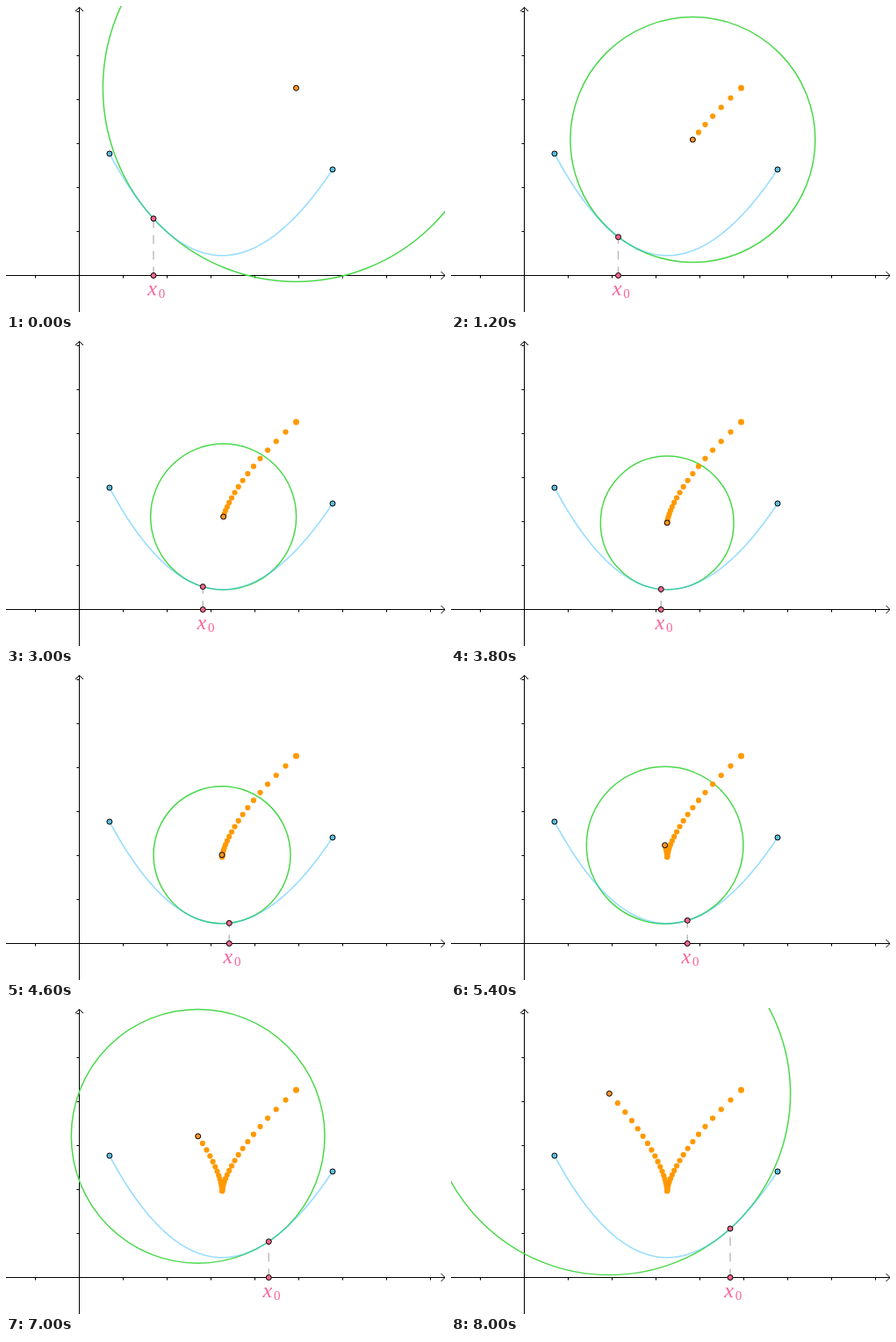
Write an HTML page that moves like this. It is 500 px wide and 348 px high and loops after 8.2 s.

```html
<!DOCTYPE html>
<html lang="en">
<head>
<meta charset="utf-8">
<title>Osculating circle</title>
<style>
  html, body { margin: 0; width: 100%; height: 100%; overflow: hidden; background: #fff; }
  svg { display: block; width: 500px; height: 348px; }
  .axis { fill: none; stroke: #000; stroke-width: 1; }
  .point { stroke: #000; stroke-width: 1; }
  .label { fill: #f9649b; font: italic 24px "Liberation Serif", serif; }
  .label .sub { font: 15px "Liberation Serif", serif; }
</style>
</head>
<body>
<svg id="stage" viewBox="0 0 500 348"></svg>
<script>
const STEP = 200, STEPS = 41;
const AXIS_X = 83.5, AXIS_Y = 306.5, UNIT = 50;
const START_X = 168, STEP_X = 3.75;
const CURVE = { from: 117.9, to: 372, minX: 246.15, minY: 283.75, bend: 0.013206, twist: 2.04e-5 };

const stage = document.getElementById('stage');

function add(tag, attrs, parent = stage) {
  const el = document.createElementNS('http://www.w3.org/2000/svg', tag);
  set(el, attrs);
  return parent.appendChild(el);
}

function set(el, attrs) {
  for (const key in attrs) el.setAttribute(key, attrs[key]);
}

// Cubic curve: height, slope and second derivative measured upwards.
function curveY(x) {
  const d = x - CURVE.minX;
  return CURVE.minY - CURVE.bend * d * d / 2 + CURVE.twist * d ** 3 / 6;
}

function osculating(x) {
  const d = x - CURVE.minX;
  const slope = CURVE.bend * d - CURVE.twist * d * d / 2;
  const second = CURVE.bend - CURVE.twist * d;
  const q = 1 + slope * slope;
  return { cx: x - slope * q / second, cy: curveY(x) - q / second, r: q ** 1.5 / second };
}

const xAt = step => START_X + STEP_X * step;
const point = (fill, cx = 0, cy = 0) => add('circle', { class: 'point', r: 3, fill, cx, cy });

function drawAxes() {
  let d = `M0 ${AXIS_Y}H500M495.5 302L500 ${AXIS_Y}L495.5 311` +
          `M${AXIS_X} 348V1.5M79 6L${AXIS_X} 1.5L88 6`;
  for (let x = AXIS_X - UNIT; x < 500; x += UNIT) if (x !== AXIS_X) d += `M${x} ${AXIS_Y}v3`;
  for (let y = AXIS_Y - UNIT; y > 0; y -= UNIT) d += `M${AXIS_X} ${y}h-3`;
  add('path', { class: 'axis', d });
}

function curvePath() {
  const n = 80, pts = [];
  for (let i = 0; i <= n; i++) {
    const x = CURVE.from + (CURVE.to - CURVE.from) * i / n;
    pts.push(`${x.toFixed(2)} ${curveY(x).toFixed(2)}`);
  }
  return 'M' + pts.join('L');
}

drawAxes();
const circle = add('circle', { fill: 'none', stroke: '#4bd84b', 'stroke-width': 1.5 });
const drop = add('line', { y1: AXIS_Y, stroke: '#b3b3b3', 'stroke-width': 1.3, 'stroke-dasharray': '10 8' });
add('path', { d: curvePath(), fill: 'none', stroke: '#33bbff', 'stroke-opacity': 0.5, 'stroke-width': 1.6 });

const trace = Array.from({ length: STEPS }, (_, i) => {
  const { cx, cy } = osculating(xAt(i));
  return add('circle', { cx, cy, r: i ? 3.1 : 3.5, fill: '#ff9900' });
});

for (const x of [CURVE.from, CURVE.to]) point('#5bbfe0', x, curveY(x));
const center = point('#ff9526');
const foot = point('#f5668c');
const touch = point('#f5668c');
foot.setAttribute('cy', AXIS_Y);

const label = add('g', { class: 'label' });
add('text', { x: -6.8, y: 328.5 }, label).textContent = 'x';
add('text', { class: 'sub', x: 5.8, y: 331.5 }, label).textContent = '0';

function render(time) {
  const step = Math.floor(time / STEP) % STEPS;
  const x = xAt(step), y = curveY(x), osc = osculating(x);
  set(circle, osc);
  set(center, { cx: osc.cx, cy: osc.cy });
  set(touch, { cx: x, cy: y });
  set(foot, { cx: x });
  set(drop, { x1: x, x2: x, y2: y });
  set(label, { transform: `translate(${x} 0)` });
  trace.forEach((dot, i) => set(dot, { visibility: i < step ? 'visible' : 'hidden' }));
}

function loop(now) {
  render(now);
  requestAnimationFrame(loop);
}
render(0);
requestAnimationFrame(loop);
</script>
</body>
</html>
```
